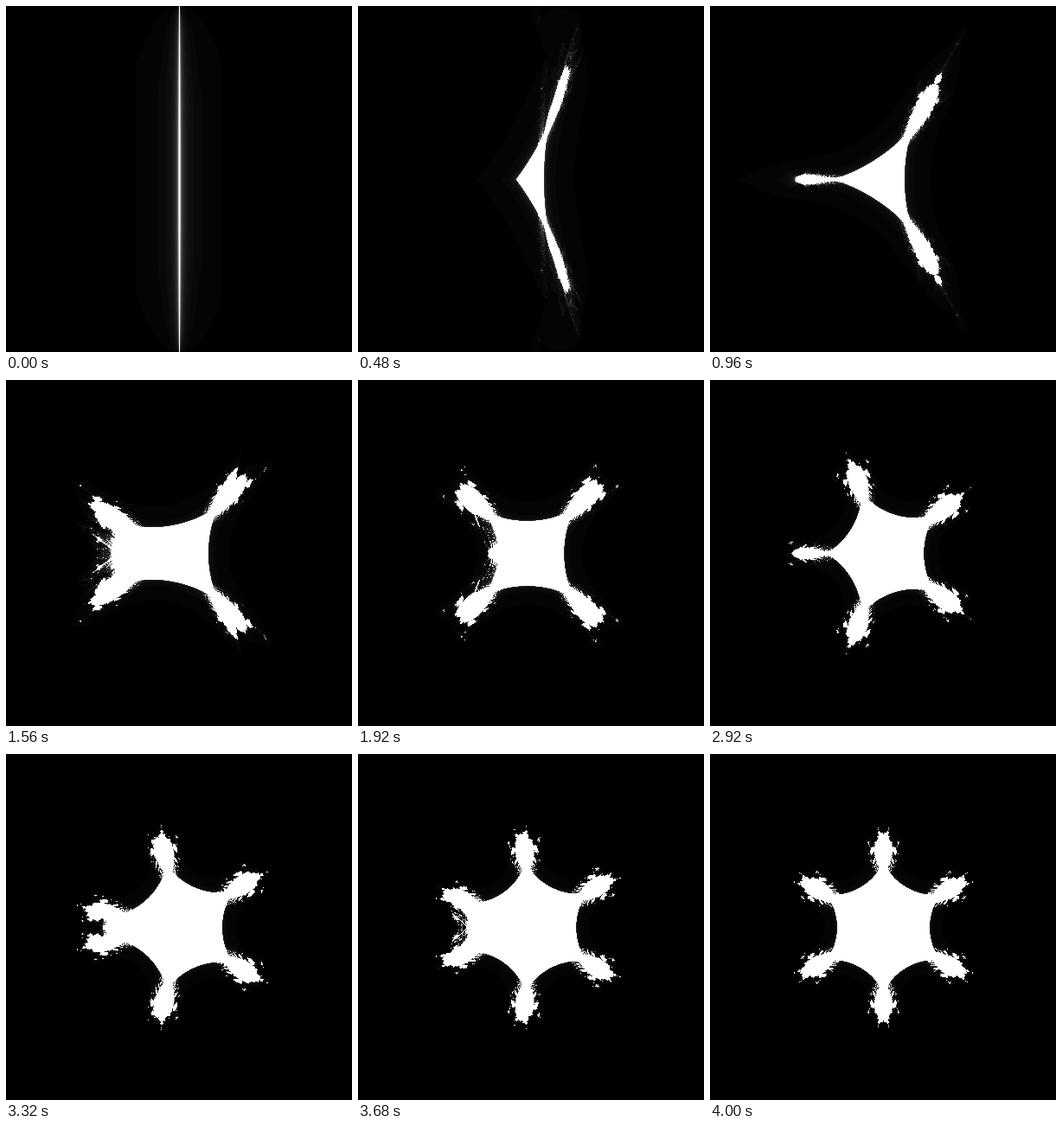
An HTML page with a canvas that plays this animation: 400 by 400 pixels, repeating every 4.04 s.

```html
<!DOCTYPE html>
<html lang="en">
<head>
<meta charset="utf-8">
<title>Multicorn morph</title>
<style>
  html, body { margin: 0; width: 100%; height: 100%; overflow: hidden; background: #000; }
  canvas { display: block; }
</style>
</head>
<body>
<canvas id="stage" width="400" height="400"></canvas>
<script>
const SIZE = 400, HALF = SIZE / 2, UNIT = 100;
const FRAMES = 101, STEP = 40, MAX = 255;
const ctx = document.getElementById('stage').getContext('2d');
const cache = [];

// Iterates z -> conj(z)^p + c and counts the steps until |z| > 2.
function escapeTime(cx, cy, p) {
  let x = cx, y = cy, savedX = 9, savedY = 9;
  for (let n = 0; n < MAX; n++) {
    const r2 = x * x + y * y;
    if (r2 > 4) return n;
    // A repeating orbit never escapes.
    if (Math.abs(x - savedX) + Math.abs(y - savedY) < 1e-4) return MAX;
    if ((n & (n - 1)) === 0) { savedX = x; savedY = y; }
    const r = Math.pow(r2, p / 2), angle = -p * Math.atan2(y, x);
    x = r * Math.cos(angle) + cx;
    y = r * Math.sin(angle) + cy;
  }
  return MAX;
}

function render(power) {
  const image = ctx.createImageData(SIZE, SIZE);
  const pixels = new Uint32Array(image.data.buffer);
  for (let row = 0; row <= HALF; row++) {
    for (let col = 0; col < SIZE; col++) {
      const n = escapeTime((col - HALF) / UNIT, (HALF - row) / UNIT, power);
      const grey = n === MAX ? 255 : n & ~3;
      const color = 0xff000000 | grey * 0x010101;
      pixels[row * SIZE + col] = color;
      if (row) pixels[(SIZE - row) * SIZE + col] = color;
    }
  }
  return image;
}

let shown = -1;
function draw(now) {
  const i = Math.floor(now / STEP) % FRAMES;
  if (i !== shown) {
    cache[i] ||= render(1 + 4 * i / (FRAMES - 1));
    ctx.putImageData(cache[i], 0, 0);
    shown = i;
  }
  requestAnimationFrame(draw);
}
draw(0);
</script>
</body>
</html>
```
